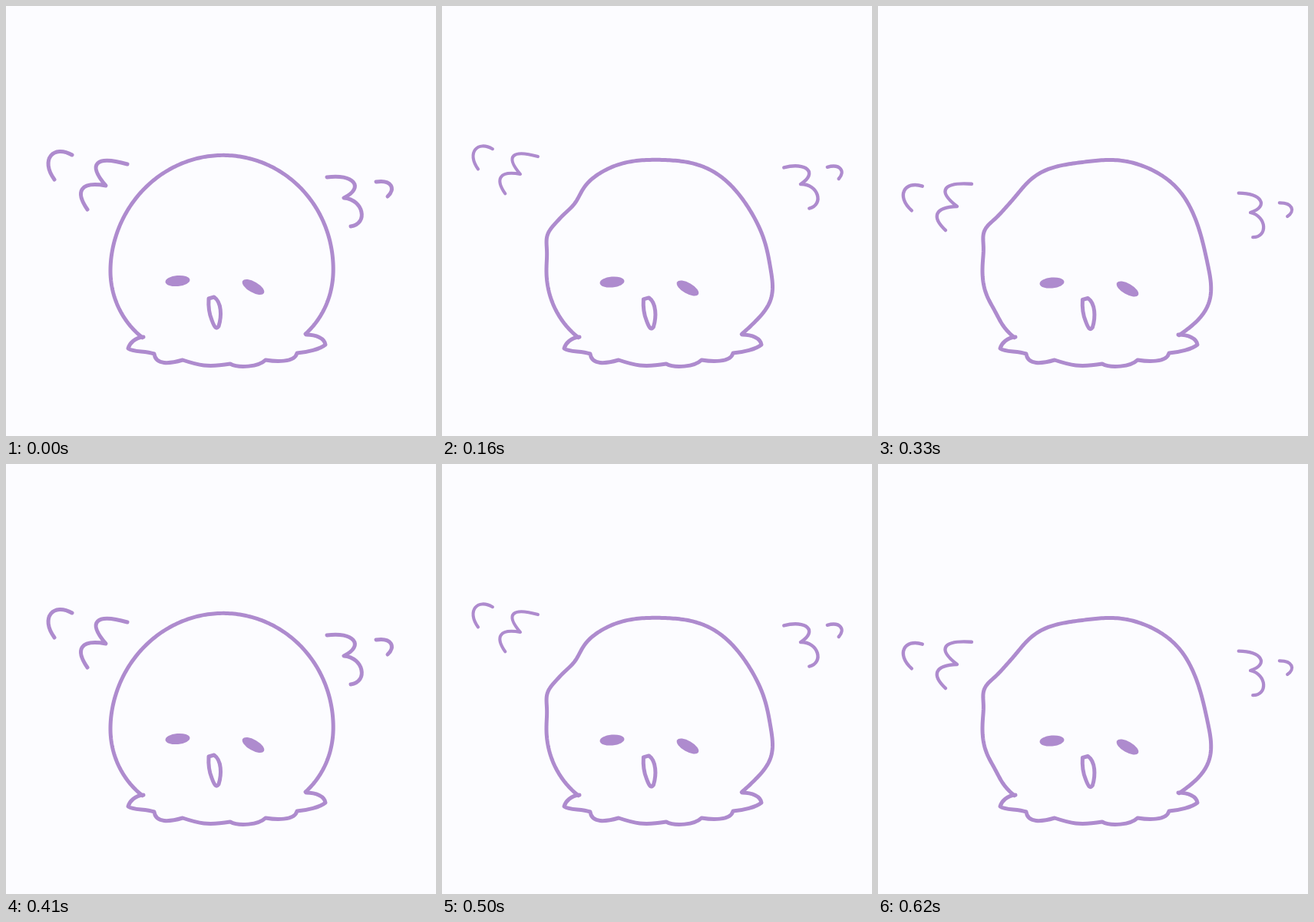
An HTML page with a canvas that plays this animation: 560x560 px, repeating every 660 ms.

```html
<!DOCTYPE html>
<html lang="en">
<head>
<meta charset="utf-8">
<title>Flapping blob</title>
<style>
html, body { margin: 0; width: 100%; height: 100%; overflow: hidden; background: #fcfcff; }
canvas { display: block; width: 560px; height: 560px; }
</style>
</head>
<body>
<canvas id="stage" width="560" height="560"></canvas>
<script>
const ctx = document.getElementById('stage').getContext('2d');
const PAPER = '#fcfcff';
const INK = '#ae8bce';
const LOOP = 660;
const RAD = Math.PI / 180;

const skirt = new Path2D(`M179 431 C168 432 161 439 159 446 C166 451 180 449 193 453
  C195 468 213 466 230 461 C251 468 262 471 292 466 C303 472 329 470 338 461
  C350 463 376 465 379 452 C392 451 409 447 416 441 C415 433 404 428 391 428`);
const mouth = new Path2D(`M264 381 L271 379 C281 386 281 404 277 417
  C274 421 272 420 268 409 Q263 397 264 381 Z`);

// Wing marks are drawn around the cusp where the two inner arcs meet.
const leftWing = new Path2D(`M-44 -40 C-68 -54 -86 -34 -67 -8
  M28 -28 C-14 -40 -24 -28 0 0 C-34 -6 -40 8 -24 31`);
const rightWing = new Path2D(`M42 -21 C62 -24 68 -12 57 -2
  M-22 -27 C12 -32 28 -14 0 0 C26 2 32 34 9 37`);

// Bumps push the head outline: angle (0 left, 90 top, 180 right), amount, width.
// Wings are x, y, turn in degrees, size.
const rest = {
  bumps: [],
  left: [130, 234, 0, 1], right: [440, 250, 0, 1], face: [0, 0]
};
const lift = {
  bumps: [[27, 5, 9], [59, 3, 7], [88, -5, 10], [127, 4, 14]],
  left: [112, 223, 0, 0.99], right: [455, 239, -5, 1], face: [-2, 1]
};
const spread = {
  bumps: [[18, 6, 7], [39, -7, 9], [92, -6, 20], [145, -4, 22], [194, 8, 13]],
  left: [102, 219, 0, 0.82], right: [467, 232, -6, 0.88], face: [-2, 1.5]
};
const dip = {
  bumps: [[43, -6, 13], [90, -5, 16], [190, 4, 18]],
  left: [122, 250, 0, 1.03], right: [453, 261, 4, 0.99], face: [3, 1]
};
const low = {
  bumps: [[-22, -3, 9], [20, 7, 7], [42, -6, 14], [84, -8, 20], [135, 4, 18], [196, 12, 17]],
  left: [103, 261, -12, 0.88], right: [485, 269, 8, 0.85], face: [3, 2.5]
};

function between(a, b) {
  const mean = key => a[key].map((v, i) => (v + b[key][i]) / 2);
  return {
    bumps: [...a.bumps, ...b.bumps].map(([angle, amount, width]) => [angle, amount / 2, width]),
    left: mean('left'), right: mean('right'), face: mean('face')
  };
}

const TIMELINE = [
  [0, rest], [120, lift], [160, spread], [250, dip], [290, between(dip, low)], [330, low],
  [410, rest], [450, lift], [500, spread], [580, dip], [620, low]
];

// A circle, slightly taller at the top, drawn in at the neck and pushed by bumps.
function headRadius(angle, bumps) {
  const crown = 5.8 * Math.max(0, Math.sin((angle - 10) * RAD)) ** 2;
  const below = Math.max(0, -angle, angle - 180);
  const neck = 10 * (below / 40) ** 2;
  return bumps.reduce(
    (r, [at, amount, width]) => r + amount * Math.exp(-(((angle - at) / width) ** 2)),
    145 + crown - neck);
}

function drawHead(bumps) {
  ctx.beginPath();
  for (let angle = -40; angle <= 217; angle++) {
    const r = headRadius(angle, bumps);
    ctx.lineTo(281 - r * Math.cos(angle * RAD), 345 - r * Math.sin(angle * RAD));
  }
  ctx.stroke();
}

function drawWing(path, [x, y, turn, size]) {
  ctx.save();
  ctx.translate(x, y);
  ctx.rotate(turn * RAD);
  ctx.scale(size, size);
  ctx.stroke(path);
  ctx.restore();
}

function drawEye(x, y, turn) {
  ctx.beginPath();
  ctx.ellipse(x, y, 16, 7, turn * RAD, 0, 2 * Math.PI);
  ctx.fill();
}

function drawFace([dx, dy]) {
  ctx.save();
  ctx.translate(dx, dy);
  drawEye(223.5, 358, -5);
  drawEye(322, 366, 30);
  ctx.translate(-dx * 0.2, -dy * 0.4);
  ctx.stroke(mouth);
  ctx.restore();
}

function draw(pose) {
  ctx.fillStyle = PAPER;
  ctx.fillRect(0, 0, 560, 560);
  ctx.strokeStyle = ctx.fillStyle = INK;
  ctx.lineCap = ctx.lineJoin = 'round';
  ctx.lineWidth = 5;
  drawHead(pose.bumps);
  ctx.stroke(skirt);
  drawWing(leftWing, pose.left);
  drawWing(rightWing, pose.right);
  drawFace(pose.face);
}

function tick() {
  const time = performance.now() % LOOP;
  draw(TIMELINE.findLast(([start]) => start <= time)[1]);
  requestAnimationFrame(tick);
}
tick();
</script>
</body>
</html>
```
